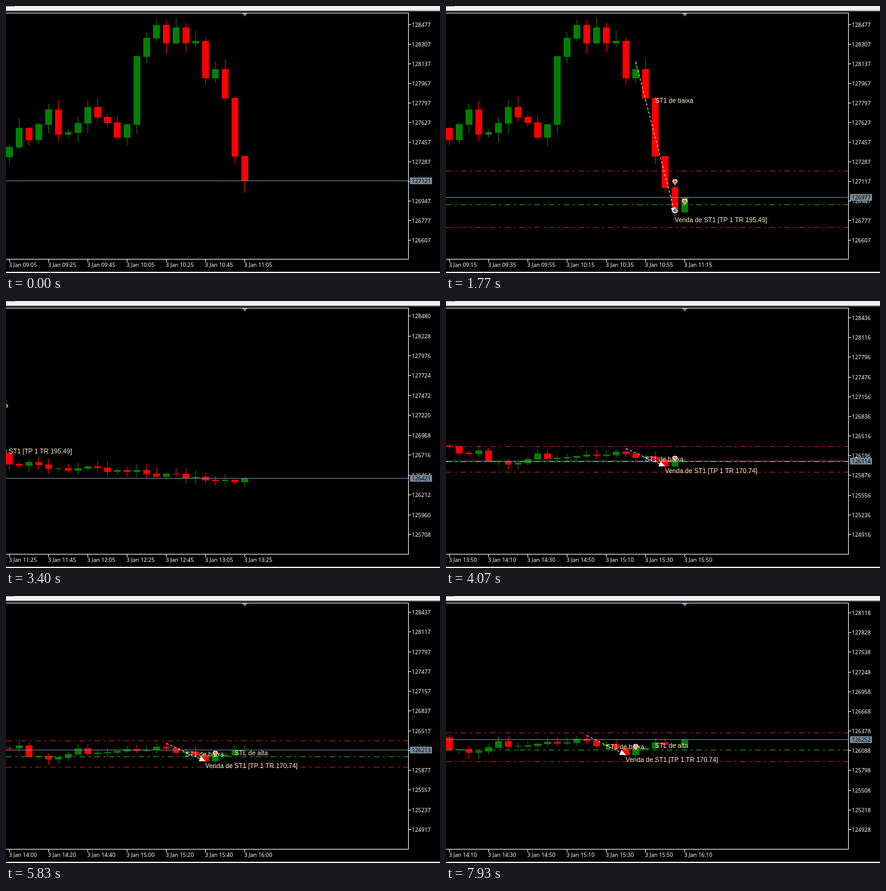
Write an HTML page with a canvas that moves like this. It is 708 by 436 pixels and loops after 8000 ms.

```html
<!DOCTYPE html>
<html lang="pt">
<head>
<meta charset="utf-8">
<style>
html, body { margin: 0; width: 100%; height: 100%; overflow: hidden; background: #000; }
canvas { display: block; }
</style>
</head>
<body>
<canvas id="chart" width="708" height="436"></canvas>
<script>
const g = document.getElementById('chart').getContext('2d');
const LOOP = 8000, TICK = 40, RIGHT = 656, BOTTOM = 413, NOW_X = 389, BAR = 16;
const RED = '#f00', GREEN = '#008000', SLATE = '#778899', NOTE = '#fbefcc';

const lerp = (a, b, u) => a + (b - a) * u;
const mix = (a, b, u) => a.map((v, i) => lerp(v, b[i], u));
const noise = n => { const v = Math.sin(n * 12.9898) * 43758.5453; return v - Math.floor(v); };

// Value at x on a line through sorted [x, value] points, with an optional easing of each part
function along(points, x, ease = u => u) {
  const i = points.findIndex(p => p[0] > x);
  if (i < 0) return points[points.length - 1][1];
  const [x0, a] = points[i - 1], [x1, b] = points[i];
  return lerp(a, b, ease((x - x0) / (x1 - x0)));
}

// Turning points of the closing price, by five-minute candle from 09:05
const turns = [
  [-1, 127330], [1, 127579], [2, 127478], [4, 127739], [5, 127526], [6, 127540], [8, 127760],
  [11, 127500], [12, 127611], [13, 128201], [15, 128472], [16, 128318], [17, 128450],
  [18, 128318], [19, 128334], [20, 128015], [21, 128089], [22, 127839], [23, 127335],
  [25, 126851], [26, 126958], [28, 126600], [57, 126353], [58, 126243], [60, 126283],
  [61, 126104], [63, 126064], [66, 126233], [67, 126154], [74, 126263], [78, 126134],
  [79, 126035], [80, 126114], [81, 126134], [82, 126213], [83, 126186], [85, 126256]
];
const closeOf = i => along(turns, i) + (turns.some(p => p[0] === i) ? 0 : 80 * (noise(i) - 0.5));
const candles = Array.from({ length: 86 }, (_, i) => {
  const open = closeOf(i - 1), close = closeOf(i);
  return {
    open, close,
    high: Math.max(open, close) + 90 * noise(i + 100),
    low: Math.min(open, close) - 90 * noise(i + 200)
  };
});

// When candles begin; between FAST and SLOW they rush past
const FAST = 2880, SLOW = 4040;
const starts = [[-1200, 24], [400, 25], [1200, 26], [2080, 27], [2600, 28], [FAST, 29],
  [SLOW, 81], [4800, 82], [5800, 83], [7000, 84], [7680, 85]];
const quotes = [[0, 127121], [1770, 126977], [2770, 126600], [4070, 126084],
  [5100, 126150], [6630, 126186], [7960, 126252]];
const ticks = [
  ...starts.map(([t, i]) => [t, candles[i - 1].close]),
  ...quotes.flatMap(([t, p]) => [[t - TICK, p], [t + TICK, p]])
].sort((a, b) => a[0] - b[0]);

const rushing = t => t >= FAST && t < SLOW;
function candleAt(t) {
  if (rushing(t)) return 29 + Math.floor((t - FAST) / (SLOW - FAST) * 52);
  return starts.filter(s => s[0] <= t).pop()[1];
}
function priceAt(t, now) {
  if (rushing(t)) return candles[now].close;
  return along(ticks, t, u => u + (noise(t) - 0.5) * 3 * u * (1 - u));
}

// Price axis: first label, its y, price step and pixel step
const scales = {
  open: [128477, 30, 170, 32],
  drop: [128521, 22, 190, 32.68],
  flat: [128436, 27.5, 320, 32.18],
  late: [128437, 26.5, 320, 32.27],
  end: [128118, 27.5, 290, 32.18]
};
function scaleAt(now) {
  if (now < 28) return scales.open;
  if (now < 82) return mix(scales.drop, scales.flat, Math.min(1, (now - 28) / 50));
  if (now < 84) return scales.late;
  return now < 85 ? mix(scales.late, scales.end, 0.5) : scales.end;
}

function rect(color, x, y, w, h) {
  g.fillStyle = color;
  g.fillRect(Math.round(x), Math.round(y), w, h);
}
function shape(color, points) {
  g.fillStyle = color;
  g.beginPath();
  for (const [x, y] of points) g.lineTo(x, y);
  g.closePath();
  g.fill();
}
function text(str, x, y, color, font = '9px "Noto Sans", "DejaVu Sans", sans-serif') {
  g.font = font;
  g.fillStyle = color;
  g.fillText(str, x, y);
}
function dashed(color, dash, x0, y0, x1, y1) {
  g.strokeStyle = color;
  g.setLineDash(dash);
  g.beginPath();
  g.moveTo(x0, y0);
  g.lineTo(x1, y1);
  g.stroke();
  g.setLineDash([]);
}

function draw(time) {
  const t = Math.floor(time / TICK) * TICK;
  const now = candleAt(t), price = priceAt(t, now);
  const [top, y0, step, gap] = scaleAt(now);
  const X = i => NOW_X + (i - now) * BAR;
  const Y = p => y0 + (top - p) * gap / step;

  const trend = (from, high, to, low) => {
    const x0 = X(from) + 0.5, yA = Y(high), x1 = X(to) + 0.5, yB = Y(low);
    dashed('#fff', [4, 3], x0, yA, x1, yB);
    const a = Math.atan2(yB - yA, x1 - x0);
    const wing = s => [x1 - 11 * Math.cos(a + s), yB - 11 * Math.sin(a + s)];
    shape('#fff8e6', [[x1, yB], wing(0.42), wing(-0.42)]);
  };
  const note = (str, i, p) =>
    text(str, X(i), Math.round(Y(p)) + 11, NOTE, '10.6px "Liberation Sans", Arial, sans-serif');
  const deal = (i, p, buy) => {
    const x = X(i) + 0.5, y = Math.round(Y(p)) + 0.5, s = buy ? -1 : 1;
    const arrow = r => [[-r, -1], [-r + 1.5, -r], [r - 1.5, -r], [r, -1], [0, r + 0.5]]
      .map(([dx, dy]) => [x + dx, y + dy * s]);
    shape('#fff', arrow(4.5));
    shape(buy ? '#1688b8' : '#f0601c', arrow(3.2));
  };
  const levels = (stop, entry, target) => {
    const line = (p, color) => {
      const y = Math.round(Y(p)) + 0.5;
      dashed(color, [9, 6, 3, 6], 0, y, RIGHT, y);
    };
    line(stop, '#d01e1e');
    line(entry, '#1cb41c');
    line(target, '#d01e1e');
  };

  rect('#000', 0, 0, 708, 436);
  g.lineWidth = 1;
  g.save();
  g.beginPath();
  g.rect(0, 12, RIGHT, BOTTOM - 12);
  g.clip();

  for (let i = now - 24; i <= now; i++) {
    const c = candles[i], close = i === now ? price : c.close;
    const color = close < c.open ? RED : GREEN;
    const hi = Math.round(Y(Math.max(c.high, close))), lo = Math.round(Y(Math.min(c.low, close)));
    const a = Math.round(Y(Math.max(c.open, close))), b = Math.round(Y(Math.min(c.open, close)));
    rect(color, X(i), hi, 1, lo - hi + 1);
    rect(color, X(i) - 5, a, 11, b - a + 1);
  }

  const second = now >= 80;
  if (t >= 1200 && t < 2400) levels(127207, 126915, 126719);
  if (second) levels(126357, 126102, 125934);
  const py = Math.round(Y(price) - 0.2);
  rect(SLATE, 0, py, RIGHT, 1);

  if (now === 26) {
    trend(21, 128153, 25, 126835);
    note('ST1 de baixa', 23, 127855);
  } else if (now > 26) {
    trend(20, 128335, 26, 126761);
    trend(22, 128105, 26, 126761);
    note('ST2 de baixa', 22, 128105);
    note('ST1 de baixa', 24, 127404);
  }
  if (t >= 720) deal(25, 127112);
  if (t >= 1080) deal(25, 126867, true);
  if (t >= 1240) deal(26, 126942);
  if (t >= 2400) deal(27, 126695, true);
  if (now >= 26) note('Venda de ST1 [TP 1 TR 195.49]', 25, 126820);
  if (second) {
    trend(75, 126313, 79, 126025);
    deal(80, 126150);
    note('ST1 de baixa', 77, 126214);
    note('Venda de ST1 [TP 1 TR 170.74]', 79, 126025);
  }
  if (now >= 83) note('STL de alta', 82, 126228);
  g.restore();

  // Frame and axes
  rect('#f2f2f2', 0, 0, 708, 7);
  rect('#a0a0a0', 0, 7, 708, 1);
  rect('#696969', 0, 8, 708, 1);
  rect('#8d8dbb', 0, 0, 15, 1);
  rect('#f4f4f4', 0, 434, 708, 2);
  rect('#fff', 0, 11, RIGHT + 1, 1);
  rect('#fff', 0, BOTTOM, RIGHT + 1, 1);
  rect('#fff', RIGHT, 11, 1, BOTTOM - 10);
  shape(SLATE, [[385, 12], [394, 12], [389.5, 17]]);

  for (let k = 0; k < 12; k++) {
    const y = Math.floor(y0 + k * gap);
    rect('#fff', RIGHT, y, 5, 1);
    text(Math.round(top) - k * Math.round(step), 662, y + 4, '#fff');
  }
  rect(SLATE, 659, py - 5, 36, 11);
  text(Math.round(price), 662, py + 4, '#000');

  for (let k = 0; k < 7; k++) {
    const m = 545 + (now - 24 + 4 * k) * 5;
    const two = v => String(v).padStart(2, '0');
    rect('#fff', 5 + 64 * k, BOTTOM, 1, 5);
    text(`3 Jan ${two(Math.floor(m / 60))}:${two(m % 60)}`, 4.5 + 64 * k, 426, '#fff');
  }
}

const begin = performance.now();
function frame() {
  draw((performance.now() - begin) % LOOP);
  requestAnimationFrame(frame);
}
frame();
</script>
</body>
</html>
```
